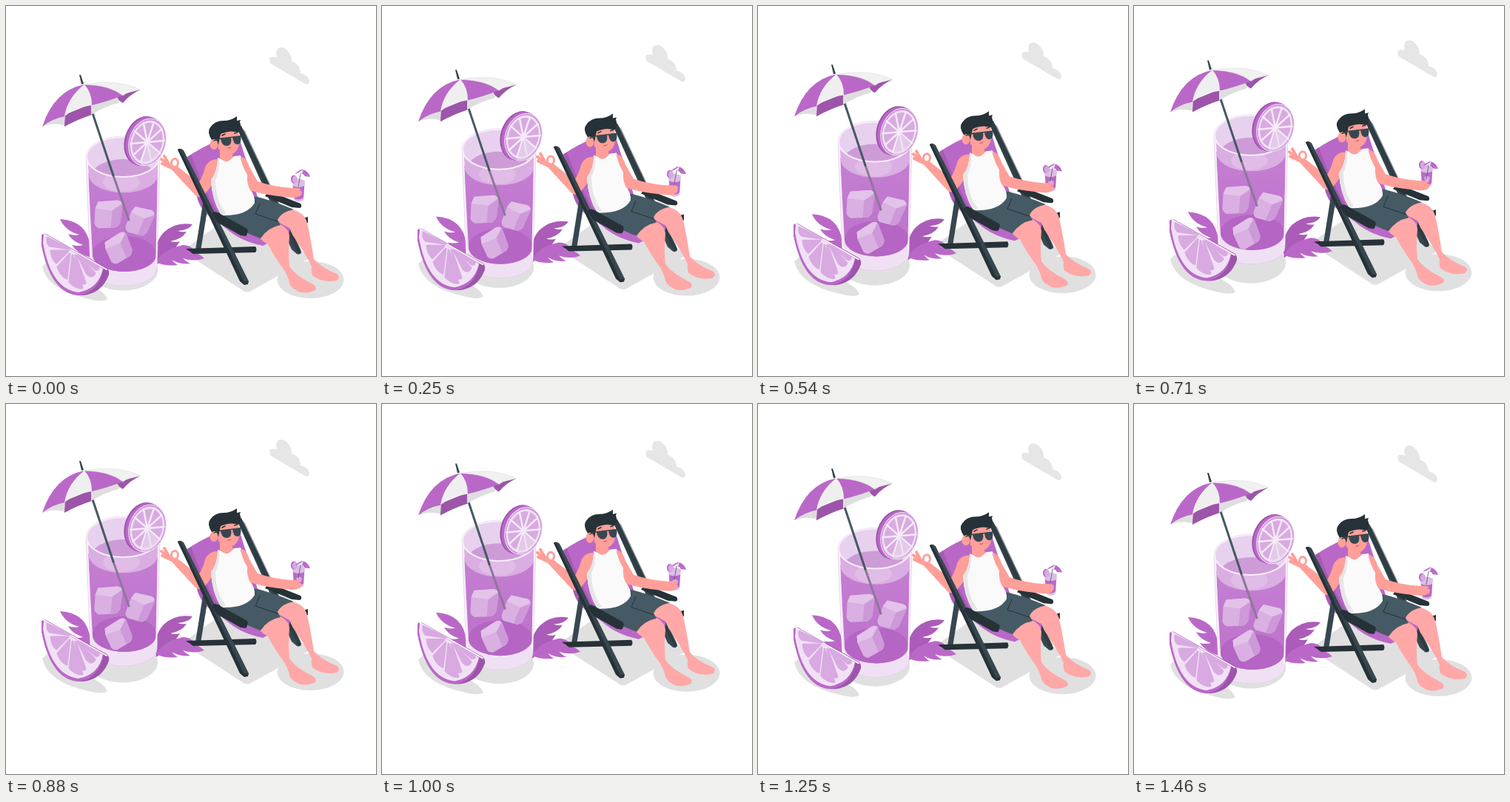
An HTML page for the animation above (1500 ms loop, 500 by 500 pixels).

```html
<!DOCTYPE html>
<html lang="en">
<head>
<meta charset="utf-8">
<title>Summer drink</title>
<style>
  html, body { margin: 0; width: 100%; height: 100%; overflow: hidden; background: #fff; }
  svg { display: block; width: 100%; height: 100%; }
  .line { fill: none; stroke-linecap: round; stroke-linejoin: round; }
  .purple { fill: #ba68c8; }
  .deep { fill: #9c55a9; }
  .pale { fill: #f1e1f5; }
  .flesh { fill: #d8aae1; }
  .shadow { fill: #e0e0e0; }
  .frame { fill: #37474f; }
  .dark { fill: #263238; }
  .skin { fill: #ff9f99; }
  .leg { fill: #ffa8a7; }
</style>
</head>
<body>
<svg viewBox="0 0 500 500">
  <defs>
    <linearGradient id="liquid" x1="0" y1="0" x2="0" y2="1">
      <stop offset="0" stop-color="#c47fd2"/>
      <stop offset="1" stop-color="#bc70ca"/>
    </linearGradient>
    <clipPath id="mouth"><ellipse cx="158" cy="204" rx="48" ry="26.500"/></clipPath>
    <g id="cube">
      <path fill="#d9b0e1" d="M-14-17L12-19Q18-18 19-13L16 11Q14 16 9 18L-13 19Q-18 17-19 12L-18-7Z"/>
      <path fill="#e3c3e9" d="M-14-17L12-19Q18-18 18-15L5-5-18-8Z"/>
      <path fill="#cd99d8" d="M5-5L19-14 16 11Q14 16 7 18L3 18Z"/>
    </g>
  </defs>

  <!-- Cloud and ground -->
  <g data-rise="10">
    <path fill="#e6e6e6" d="M358 78C355 73 356 68 361 69Q364 68 366 70C363 58 369 54 376 57C383 61 387 69 386 75C393 77 398 83 398 91C404 92 409 96 410 101C410 105 408 107 404 105Z"/>
    <path class="shadow" d="M238 331L284 298 345 292 412 340 331 385Q326 388 321 385Z"/>
    <ellipse class="shadow" cx="411.500" cy="370" rx="45" ry="25"/>
    <ellipse class="shadow" cx="158" cy="357" rx="47" ry="27.500"/>
    <path class="shadow" d="M49 352Q56 384 112 396Q131 401 137 396Q133 388 126 384L60 342Z"/>
    <path class="purple" d="M73 288Q110 290 114 326V340Q96 334 89 323Q97 325 104 323Q89 318 84 308Q92 311 99 309Q80 304 73 288Z"/>
    <path fill="#ab5cb8" d="M203 350Q198 322 213 306Q229 291 252 295Q247 303 232 304Q238 306 244 305Q238 315 222 318Q230 320 235 318Q225 336 203 350Z"/>
    <path class="purple" d="M203 346Q211 329 239 323Q249 323 254 330L246 332Q259 332 268 341Q254 346 239 341Q244 346 249 348Q235 350 224 343Q228 348 232 350Q214 352 203 346Z"/>
  </g>

  <!-- Deck chair and man -->
  <g data-rise="10">
    <path class="frame" d="M312 165Q313 160 318 162L399 332Q398 337 393 335L386 329Z"/>
    <path class="dark" d="M312 165L317 163 323 169 398 328 399 334 395 335Z" opacity=".5"/>
    <path class="dark" d="M376 294L408 285V293L379 303Z"/>
    <path class="purple" d="M245 204Q264 191 286 182L316 181 340 258 386 285 383 306 347 324Q317 318 298 301L279 287Q263 278 258 258L264 250Z"/>
    <path fill="#a75bb4" d="M245 204L250 201Q270 256 291 286L277 282Q262 274 258 256L264 252Z"/>
    <path class="frame" d="M266 267L273 270 263 331 256 330Z"/>
    <path class="dark" d="M243 328L337 325Q340 329 337 333L253 335Z"/>
    <path class="dark" d="M355 250L398 267Q401 271 397 273L386 272 350 257Z"/>

    <path class="leg" d="M366 291Q371 277 387 275Q403 279 407 293Q412 315 416 342Q425 353 447 362Q453 366 447 371Q428 375 414 364Q412 357 413 352Q405 335 387 309L383 300Z"/>
    <path class="leg" d="M342 312Q351 296 371 295Q383 302 383 311Q381 335 383 352Q391 364 413 375Q421 379 418 384Q401 391 392 384Q383 380 382 370Q380 364 376 357Q362 338 354 322Q346 318 342 312Z"/>
    <path fill="#455a64" d="M286 279Q325 282 336 257Q361 263 389 275Q372 278 367 289L371 296Q354 299 344 314Q312 303 286 279Z"/>
    <path class="line" stroke="#263238" d="M343 267L337 281 367 291"/>

    <path class="skin" d="M285 207Q271 208 268 222Q265 232 260 239L232 217 222 219 256 256Q263 261 268 255Q281 240 287 226Z"/>
    <g class="line" stroke="#ff9f99">
      <path stroke-width="4" d="M222 217L214 203M220 215L210 207M224 219L211 213"/>
      <ellipse cx="228" cy="212" rx="4.500" ry="5.500" stroke-width="3"/>
    </g>
    <path class="skin" d="M289 193L289 207Q300 215 307 205L305 196Z"/>
    <path fill="#fafafa" d="M286 205L291 207Q299 215 308 203L317 202Q317 214 327 222Q329 240 329 246Q337 257 336 266Q326 284 291 283Q278 262 277 235Q286 224 286 205Z"/>
    <path fill="#e6e6e6" d="M286 205L288 206Q289 223 283 235Q283 262 297 280L291 283Q278 262 277 235Q286 224 286 205Z"/>
    <path class="skin" d="M286 172L313 166Q317 180 314 191Q310 201 300 201Q292 199 287 193Z"/>
    <path class="dark" d="M278 181Q271 170 276 164Q282 155 294 155Q304 155 312 149L312 155 317 154 316 157Q319 164 314 171Q303 167 290 173L287 187 279 187Z"/>
    <ellipse class="skin" cx="281" cy="187" rx="5.500" ry="7"/>
    <g class="frame">
      <path d="M290 179L304 177Q306 188 299 189Q291 189 290 179ZM306 177L317 175Q319 186 313 187Q307 187 306 177Z"/>
      <path class="line" stroke="#37474f" stroke-width="1.500" d="M281 182L290 179 317 176"/>
    </g>
    <path class="line" stroke="#263238" stroke-width="1.500" d="M292 175L296 173M309 172L312 171"/>
    <path class="line" stroke="#b94f55" d="M300 192Q302 193 304 191"/>

    <path class="frame" d="M232 194Q235 191 240 195L328 372Q327 376 322 376L317 372Z"/>
    <path class="dark" d="M232 194L235 193 322 373 328 372 327 376 322 377 316 372Z"/>
    <path class="dark" d="M278 281Q280 276 286 279L326 301Q328 306 324 311L317 310 285 292Z"/>
  </g>

  <!-- Drink in hand -->
  <g data-rise="20">
    <path fill="#dfbde6" d="M387 236Q395 231 404 236L402 262Q395 267 389 262Z"/>
    <path class="purple" d="M388 243Q395 247 403 243L402 259Q395 264 389 259Z"/>
    <path class="flesh" d="M392 251l4-2 4 2-1 5-5 1Z"/>
    <ellipse class="purple" cx="389" cy="234" rx="4" ry="5.500"/>
    <ellipse class="flesh" cx="390.500" cy="234.500" rx="3.500" ry="5"/>
  </g>
  <g data-rise="11">
    <path class="line" stroke="#455a64" d="M399 221L395 244" stroke-width=".8"/>
    <path class="purple" d="M390 227Q396 221 402 221Q409 224 411 231L405 228 400 227 396 225Z"/>
    <path class="pale" d="M395 225L402 221 400 227Z"/>
    <path class="deep" d="M402 227L411 231 404 230Z"/>
  </g>
  <path data-rise="10" class="skin" d="M317 203Q326 206 329 218L340 237Q360 244 386 246Q396 245 399 248L394 250Q399 249 400 252Q398 259 388 259Q350 256 330 249Q325 240 326 228Q318 215 317 203Z"/>

  <!-- Tall glass -->
  <g data-rise="30">
    <path fill="#f0e0f4" stroke="#e3cce9" stroke-width=".7" d="M108 204A50 28 0 0 1 208 204L204 355A45 23 0 0 1 114 355Z"/>
    <path fill="url(#liquid)" d="M111 226L117 337A43 22 0 0 0 203 337L205 226Z"/>
    <ellipse cx="160" cy="335" rx="43" ry="24" fill="#b565c3"/>
    <path fill="#daaee2" d="M111 212H206L205 231A47 25 0 0 1 112 231Z"/>
    <ellipse cx="156" cy="238" rx="25" ry="13" fill="#e0bce7"/>
    <ellipse cx="158" cy="204" rx="49" ry="27" fill="#e8d1ee"/>
    <ellipse cx="158" cy="232" rx="44" ry="25" fill="#cd9cd7" clip-path="url(#mouth)"/>
    <ellipse cx="158" cy="204" rx="49" ry="27" class="line" stroke="#f7edf9" stroke-width="2"/>
    <path class="line" stroke="#faf3fb" stroke-width="1.500" d="M110 212L115 350M206 212L203 350"/>
  </g>

  <!-- Ice, parasol, fruit -->
  <g data-rise="20">
    <use href="#cube" x="138.500" y="281.500"/>
    <use href="#cube" transform="translate(181 291) rotate(18) scale(.86 1)"/>
    <use href="#cube" transform="translate(152.500 327) rotate(-28) scale(.93)"/>
    <path class="line" stroke="#8d7799" stroke-width="3" d="M145 229L166 289"/>
    <path class="line" stroke="#455a64" stroke-width="3" d="M106 112L145 229"/>

    <path class="deep" d="M79 147L79 163Q97 153 116 147V132Z"/>
    <path fill="#dedede" d="M49 163Q63 153 80 148L79 161Q63 157 49 163ZM115 133V147Q133 136 152 131L158 120Z"/>
    <path class="deep" d="M150 121Q151 128 158 131Q168 119 182 113Z"/>
    <path class="purple" d="M106 106Q65 114 49 163Q63 152 80 149Q83 124 106 106Z"/>
    <path fill="#efefef" d="M106 106Q83 124 79 149Q94 137 116 134Q116 117 106 106Z"/>
    <path class="purple" d="M106 106Q116 117 116 134Q134 130 158 121Q141 107 106 106Z"/>
    <path fill="#f1f1f1" stroke="#ddd" stroke-width=".6" d="M106 106Q141 107 158 121Q167 114 182 113Q150 98 106 106Z"/>
    <path fill="#37474f" d="M99 93L101 93 105 105 102 106Z"/>

    <g transform="translate(191 184) rotate(18)">
      <ellipse class="deep" cx="-6" cy="0" rx="25" ry="34"/>
      <ellipse class="purple" cx="-3" cy="0" rx="26" ry="34"/>
      <ellipse class="pale" rx="25" ry="33"/>
      <ellipse fill="#cf94da" rx="24" ry="32"/>
      <ellipse class="pale" rx="22.500" ry="30"/>
      <ellipse class="flesh" rx="20" ry="27"/>
      <path class="line" stroke="#f5eaf7" stroke-width="2.500" d="M0-28V28M-21-9L21 9M-21 9L21-9M-13-23L13 23M-13 23L13-23"/>
    </g>
    <path fill="#eadcee" opacity=".65" d="M193 185L207 201Q198 216 182 215Z"/>

    <path class="deep" d="M48 311Q49 306 54 308L136 354Q140 357 139 363Q130 388 104 391Q61 391 48 323Z"/>
    <path class="purple" d="M48 311Q49 306 54 308L132 354Q126 386 100 391Q61 391 48 323Z"/>
    <path class="pale" d="M51 309L131 355Q125 382 98 387Q61 383 50 320Z"/>
    <path class="line" stroke="#faf3fb" stroke-width="2" d="M51 308L136 356"/>
    <g class="flesh" stroke="#d8aae1" stroke-width="3" stroke-linejoin="round">
      <path d="M86 328L56 313Q55 320 59 324Z"/>
      <path d="M84 331L61 331Q62 341 68 347Z"/>
      <path d="M86 335L70 353Q74 364 82 368Z"/>
      <path d="M90 337L86 373Q95 382 103 381Z"/>
      <path d="M94 337L99 367Q104 378 107 374Z"/>
      <path d="M97 337L109 361Q116 369 120 361Z"/>
      <path d="M100 338L121 356Q126 357 125 353Z"/>
    </g>
  </g>
</svg>
<script>
  const PERIOD = 1500, STEPS = 36;
  const parts = [...document.querySelectorAll('[data-rise]')];

  // Everything rises and sinks linearly, at 24 steps per second.
  function draw(now) {
    const step = Math.floor(now % PERIOD / PERIOD * STEPS);
    const half = (STEPS - 1) / 2;
    const lift = 1 - Math.abs(step / half - 1);
    for (const part of parts)
      part.setAttribute('transform', `translate(0 ${-lift * part.dataset.rise})`);
    requestAnimationFrame(() => draw(performance.now()));
  }
  draw(performance.now());
</script>
</body>
</html>
```
